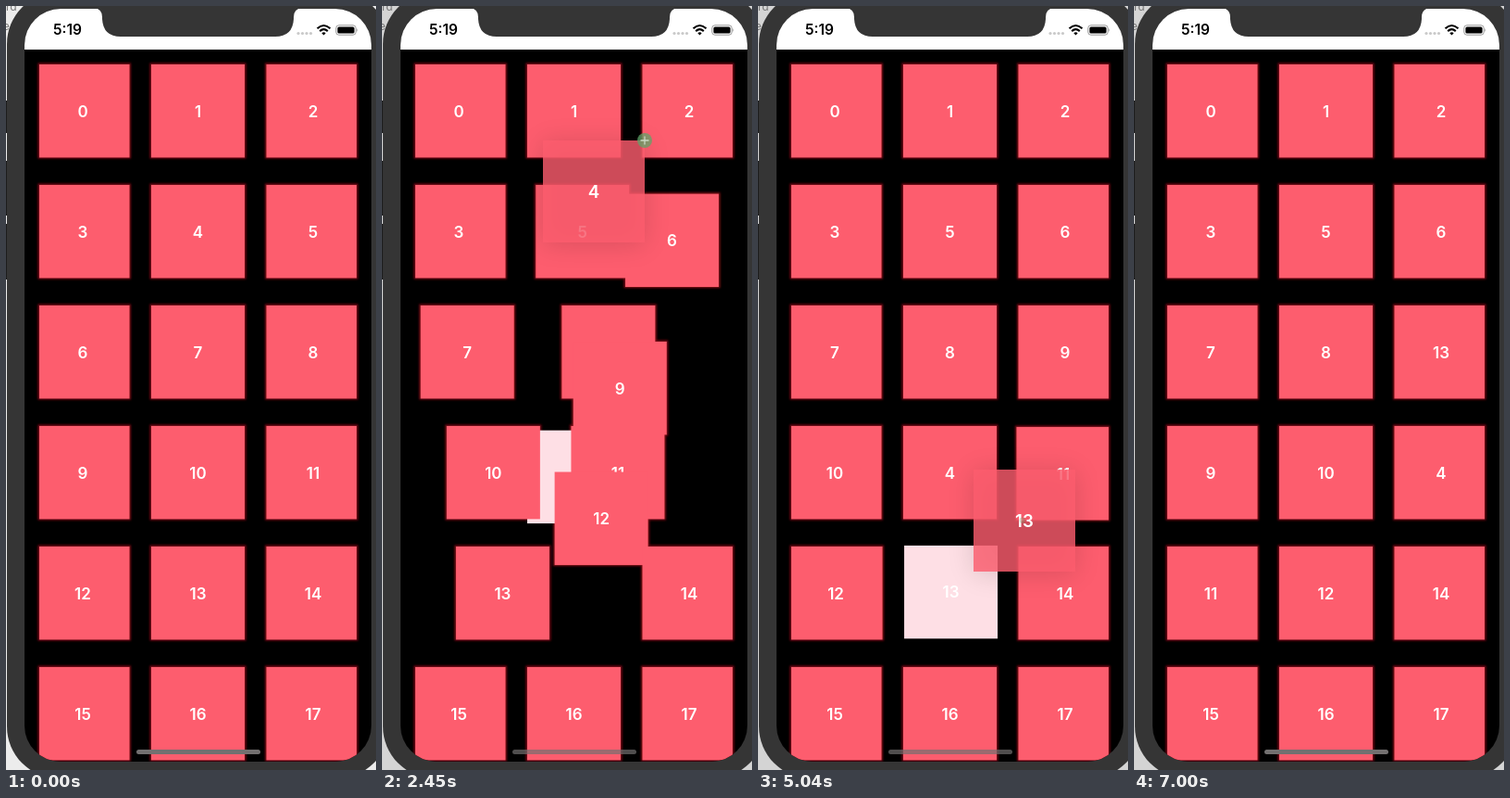
An HTML page that plays this animation: 400x824 px, repeating every 7210 ms.

```html
<!DOCTYPE html>
<html lang="en">
<head>
<meta charset="utf-8">
<title>Reordering a grid</title>
<style>
  html, body { margin: 0; width: 100%; height: 100%; overflow: hidden; background: #e9e9e9; }
  svg { display: block; width: 400px; height: 824px; }
  text { font-family: Inter, Roboto, sans-serif; }
  .num { font-size: 17px; font-weight: 600; fill: #fff; text-anchor: middle; }
  .side { font-size: 12px; fill: #777; }
</style>
</head>
<body>
<svg viewBox="0 0 400 824" xmlns="http://www.w3.org/2000/svg">
  <defs>
    <clipPath id="screen"><rect x="20" y="3" width="375" height="812" rx="39"/></clipPath>
    <filter id="blur" x="-60%" y="-60%" width="220%" height="220%"><feGaussianBlur stdDeviation="13"/></filter>
    <filter id="soft" x="-10%" y="-10%" width="120%" height="120%"><feGaussianBlur stdDeviation="0.9"/></filter>
  </defs>

  <rect id="desk" width="400" height="824"/>
  <text class="side" x="0" y="5">rd</text>
  <text class="side" x="-7" y="26">te</text>
  <g fill="#1c1c1c">
    <rect x="-1" y="102" width="4" height="35"/>
    <rect x="-1" y="167" width="4" height="59"/>
    <rect x="-1" y="235" width="4" height="60"/>
  </g>
  <rect x="1" y="-15" width="413" height="848" rx="56" fill="#353535"/>

  <g clip-path="url(#screen)">
    <rect x="20" y="3" width="375" height="812"/>
    <g id="halos" fill="#7d0d18" filter="url(#soft)"></g>
    <g id="cells"></g>
    <g id="preview">
      <rect id="shadow" x="-50" y="-48" width="100" height="100" filter="url(#blur)"/>
      <rect id="face" x="-50" y="-50" width="100" height="100" fill="#fd5d6e"/>
      <text id="label" class="num" y="6.2"></text>
    </g>
    <g id="badge">
      <circle r="8" fill="#5fa468" fill-opacity=".75"/>
      <path d="M-4.5 0H4.5M0 -4.5V4.5" stroke="#c9d8c2" stroke-width="1.3"/>
    </g>
    <rect x="20" y="3" width="375" height="44" fill="#fff"/>
    <rect id="home" x="141" y="802" width="134" height="5" rx="2.5" fill="#737070"/>
  </g>

  <path d="M95 2Q104 3 104 12V14Q105 33 124 33H291Q310 33 311 14V12Q311 3 320 2Z" fill="#353535"/>
  <text x="51" y="31" font-size="15.5" font-weight="600">5:19</text>
  <g fill="#c9c9c9">
    <circle cx="316" cy="29.5" r="1.6"/><circle cx="320.5" cy="29.5" r="1.6"/>
    <circle cx="325" cy="29.5" r="1.6"/><circle cx="329.5" cy="29.5" r="1.6"/>
  </g>
  <g fill="none" stroke="#000" stroke-width="2.1">
    <path d="M336.5 24.2Q343.5 17.8 350.5 24.2"/>
    <path d="M339.2 27.1Q343.5 23.2 347.8 27.1"/>
  </g>
  <path d="M341.3 29.2Q343.5 27.3 345.7 29.2L343.5 31.4Z"/>
  <rect x="356.8" y="20.8" width="21.4" height="10.4" rx="3" fill="none" stroke="#999"/>
  <rect x="358.4" y="22.4" width="18.2" height="7.2" rx="1.6"/>
  <path d="M379.4 24Q381.2 26 379.4 28Z" fill="#999"/>
</svg>

<script>
const LOOP = 7210, STEP = 70, COUNT = 18, COLS = 3;
const LIFT = 210, SHIFT = 300, SETTLE = 400;
const LEFT = 36, RIGHT = 379, HALF = 50.5;
const PINK = [253, 93, 110], PALE = [254, 223, 229];

// hops: [time, new slot]; path: [time, x, y] at the turning points;
// badge: where the plus sign grows from
const drags = [
  { item: 4, lift: 910, badge: [262, 202],
    hops: [[1630, 7], [1815, 10], [1935, 13], [2324, 10], [2341, 7], [2400, 4], [2976, 7], [3100, 10]],
    path: [[1330, 207.5, 243], [1680, 218.5, 317.5], [2100, 226, 600], [2450, 229, 200],
           [2590, 228, 165], [3150, 211, 474.5], [3570, 208, 510]] },
  { item: 13, lift: 4200, badge: [280, 560],
    hops: [[5024, 11], [5686, 8]],
    path: [[4480, 207.5, 633], [5040, 288, 555], [5950, 302, 344.5], [6090, 303, 343]] }
];

for (const d of drags) {
  d.start = d.path[0][0];
  d.drop = d.path.at(-1)[0];
  d.done = d.drop + SETTLE;
  d.slot = d.hops.at(-1)[1];
}

const $ = id => document.getElementById(id);
const span = (t, a, b) => Math.max(0, Math.min(1, (t - a) / (b - a)));
const smooth = u => u * u * (3 - 2 * u);
const lerp = (a, b, u) => a + (b - a) * u;
const mix = (a, b, u) => a.map((v, i) => lerp(v, b[i], u));
const rgb = (a, b, u) => `rgb(${mix(a, b, u).map(Math.round)})`;
const slotPos = s => [83 + 124.5 * (s % COLS), 113 + 130 * Math.floor(s / COLS)];

function set(el, attrs) {
  for (const k in attrs) el.setAttribute(k, attrs[k]);
}

function add(parent, tag, attrs = {}) {
  const el = document.createElementNS('http://www.w3.org/2000/svg', tag);
  set(el, attrs);
  return parent.appendChild(el);
}

const tiles = Array.from({ length: COUNT }, (_, n) => {
  const group = add($('cells'), 'g');
  const tile = {
    group,
    halo: add($('halos'), 'rect', { height: 103 }),
    rect: add(group, 'rect', { height: 100.4 }),
    text: add(group, 'text', { class: 'num' })
  };
  tile.text.textContent = n;
  return tile;
});

// Cubic through the points with slopes taken from the neighbours
function along(path, t) {
  const last = path.length - 1;
  const now = Math.max(path[0][0], Math.min(path[last][0], t));
  let i = 0;
  while (i < last - 1 && path[i + 1][0] < now) i++;
  const slope = (j, k) => {
    const a = path[Math.max(0, j - 1)], b = path[Math.min(last, j + 1)];
    return (b[k] - a[k]) / (b[0] - a[0]);
  };
  const a = path[i], b = path[i + 1], h = b[0] - a[0], u = (now - a[0]) / h;
  return [1, 2].map(k =>
    lerp(a[k], b[k], smooth(u)) +
    h * u * (1 - u) * ((1 - u) * slope(i, k) - u * slope(i + 1, k)));
}

// Overlapping slides add up; the dragged item's own slot runs slightly ahead
function layout(t) {
  const order = tiles.map((_, n) => n);
  const pos = order.map(slotPos);
  for (const { item, hops } of drags) {
    for (const [start, to] of hops) {
      if (t < start) break;
      const before = order.slice();
      order.splice(order.indexOf(item), 1);
      order.splice(to, 0, item);
      const p = smooth(span(t, start, start + SHIFT));
      const ahead = p + 2 * (p * (1 - p)) ** 2;
      order.forEach((n, slot) => {
        const a = slotPos(before.indexOf(n)), b = slotPos(slot);
        const q = n === item ? ahead : p;
        pos[n] = pos[n].map((v, i) => v + (b[i] - a[i]) * q);
      });
    }
  }
  return { order, pos };
}

let stack = '';
function drawTiles(t, held) {
  const { order, pos } = layout(t);
  if (order.join() !== stack) {
    stack = order.join();
    order.forEach(n => $('cells').appendChild(tiles[n].group));
  }
  tiles.forEach((tile, n) => {
    const [cx, cy] = pos[n];
    const x = Math.max(LEFT, cx - HALF), w = Math.min(RIGHT, cx + HALF) - x;
    const pale = held && held.item === n ? span(t, held.start - STEP, held.start + STEP) : 0;
    set(tile.rect, { x, y: cy - 50, width: w, fill: rgb(PINK, PALE, pale) });
    set(tile.halo, { x: x - 1.5, y: cy - 51.5, width: w + 3, opacity: 1 - pale });
    set(tile.text, { x: cx, y: cy + 6.5 });
  });
}

function drawBadge(t, held, corner) {
  const start = held.hops[0][0];
  const u = span(t, start - 30, start + 220);
  const shown = u > 0 && t < held.drop;
  $('badge').style.display = shown ? '' : 'none';
  if (!shown) return;
  const [x, y] = mix(held.badge, corner, smooth(u));
  set($('badge'), {
    transform: `translate(${x} ${y}) scale(${Math.min(1, 0.2 + u)})`,
    opacity: Math.min(1, u * 2)
  });
}

function drawPreview(t, held) {
  $('preview').style.display = held ? '' : 'none';
  $('badge').style.display = 'none';
  if (!held) return;
  const down = smooth(span(t, held.drop, held.done));
  const up = smooth(span(t, held.lift, held.lift + LIFT)) * (1 - down);
  const clear = span(t, held.start - STEP, held.start + STEP) * (1 - down);
  const [x, y] = mix(along(held.path, t), slotPos(held.slot), down);
  $('preview').setAttribute('transform', `translate(${x} ${y}) scale(${1 + 0.1 * up})`);
  $('shadow').setAttribute('opacity', 0.14 * up);
  $('face').setAttribute('fill-opacity', 1 - 0.19 * clear);
  $('label').textContent = held.item;
  drawBadge(t, held, [x + 55, y - 55]);
}

function draw(t) {
  const held = drags.find(d => t >= d.lift && t < d.done);
  drawTiles(t, held);
  drawPreview(t, held);
  const dim = span(t, 70, 630) * (1 - span(t, 6720, 7000));
  $('home').setAttribute('opacity', 1 - 0.3 * dim);
  $('desk').setAttribute('fill', rgb([236, 236, 236], [212, 212, 212], span(t, 840, 1120)));
}

const begin = performance.now();
function tick() {
  const t = (performance.now() - begin) % LOOP;
  draw(Math.floor(t / STEP) * STEP);
  requestAnimationFrame(tick);
}
tick();
</script>
</body>
</html>
```
